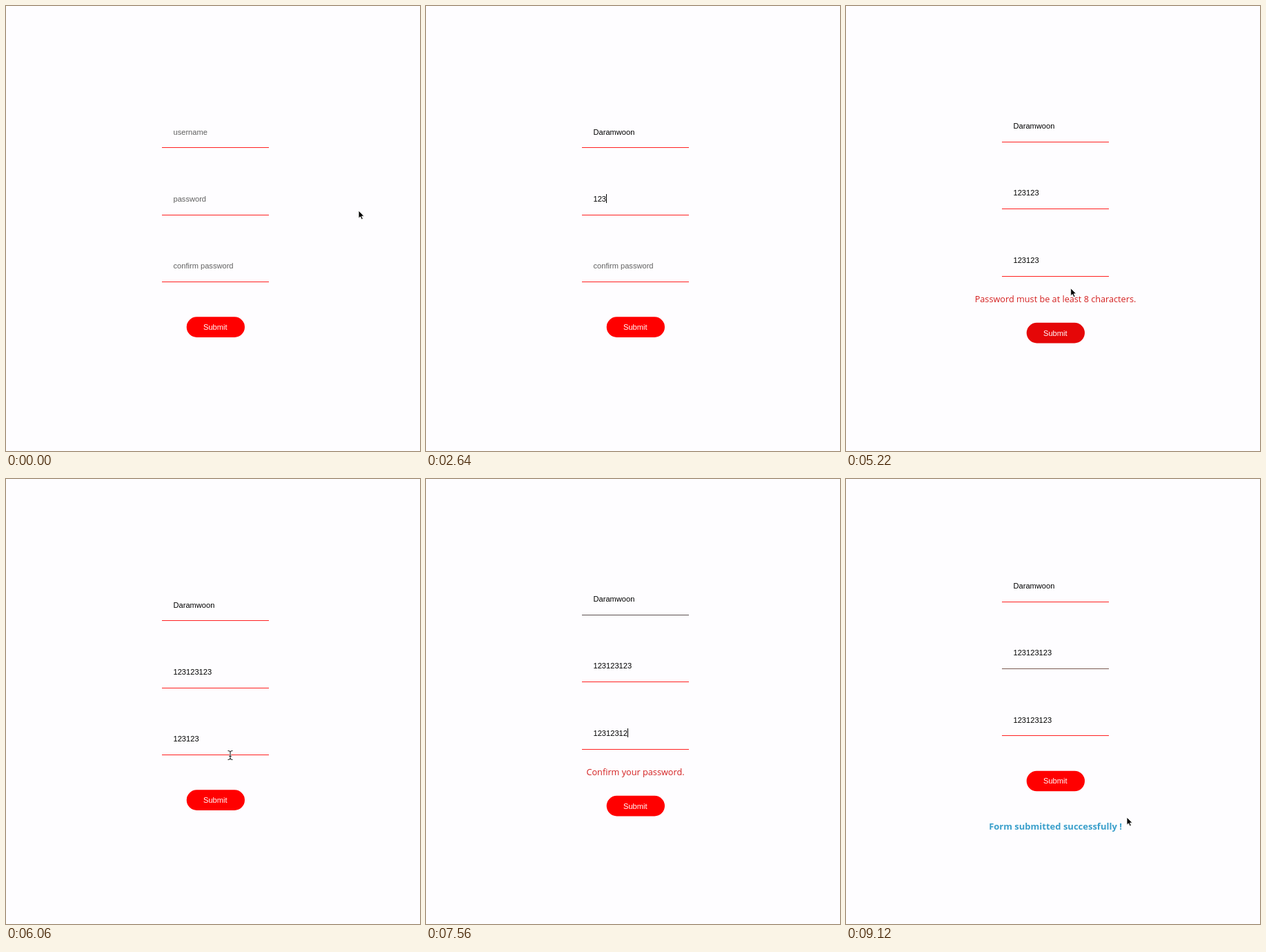
Write an HTML page that moves like this. It is 600 px wide and 646 px high and loops after 9.3 s.

```html
<!DOCTYPE html>
<html lang="en">
<head>
<meta charset="utf-8">
<title>Sign-up form</title>
<style>
  html, body { margin: 0; width: 100%; height: 100%; overflow: hidden; background: #fefdff; }
  svg { display: block; width: 600px; height: 646px; }
  .field text, .button text { font: 11.11px "Liberation Sans", Arial, sans-serif; }
  .field rect { shape-rendering: crispEdges; }
  .message { font: 12.7px "Open Sans", sans-serif; text-anchor: middle; fill: #d42020; }
  .message.success { font-size: 13px; font-weight: 700; fill: #3a9fcb; }
</style>
</head>
<body>
<svg viewBox="0 0 600 646">
  <g id="fields"></g>
  <g id="button" class="button">
    <rect x="261.7" y="451.3" width="84.3" height="29.6" rx="14.8"/>
    <text x="286" y="470" fill="#fff">Submit</text>
  </g>
  <text id="message" class="message" x="303.5"></text>
  <g id="pointer">
    <path id="arrow" d="M0 0V11.2L2.6 8.9L4.4 13L6.4 12.1L4.6 8.2H8Z" fill="#000" stroke="#fff" stroke-width=".9"/>
    <g id="beam" fill="none">
      <path d="M-3.5 -6.5Q0 -6.5 0 -4V4Q0 6.5 -3.5 6.5M3.5 -6.5Q0 -6.5 0 -4V4Q0 6.5 3.5 6.5M-1.8 1.5H1.8" stroke="#fff" stroke-width="2.4"/>
      <path d="M-3.5 -6.5Q0 -6.5 0 -4V4Q0 6.5 -3.5 6.5M3.5 -6.5Q0 -6.5 0 -4V4Q0 6.5 3.5 6.5M-1.8 1.5H1.8" stroke="#222" stroke-width="1.1"/>
    </g>
    <g id="hand" stroke="#111" stroke-width=".9" stroke-linejoin="round">
      <path d="M-1.6 1.4Q-1.6 0 -.4 0Q.7 0 1 1.2L2.1 5Q3.6 3.9 4.4 5.2Q5.7 4.3 6.4 5.6Q8.2 5 8.4 7L8.6 10Q8.4 11.6 7.6 12.3V13.8H1.8Q.6 11.6 -1.2 10.2L-3 7.8Q-3.3 6.2 -1.6 6.5L.1 7.8Z" fill="#fff"/>
      <path d="M3.2 9V12M5 9V12M6.7 9V12" stroke-width=".7"/>
    </g>
  </g>
</svg>
<script>
const LOOP = 9300, TICK = 60;
const FIELD_GAP = 97.4, TEXT_X = 242.5, LINE_Y = 205.4;
const $ = id => document.getElementById(id);

const fields = ["username", "password", "confirm password"].map(placeholder => {
  const g = document.createElementNS("http://www.w3.org/2000/svg", "g");
  g.setAttribute("class", "field");
  g.innerHTML = `<text x="${TEXT_X}" y="186.6"></text>
    <rect class="line" x="225.5" y="${LINE_Y}" width="155.5" height="1"/>
    <rect class="caret" y="176" width="1" height="13"/>`;
  $("fields").append(g);
  const [text, line, caret] = g.children;
  return { placeholder, g, text, line, caret };
});

// Each event focuses a field and appends text to it; field -1 means none.
const events = [];
const focus = (time, field, text = "") => events.push({ time, field, text });
const type = (time, field, text, step = TICK) =>
  [...text].forEach((char, i) => focus(time + i * step, field, char));

focus(60, 0);
type(360, 0, "Da", 480);
type(1500, 0, "ramwoon", 80);
focus(2220, 1);
type(2520, 1, "123");
type(2820, 1, "123");
focus(3480, 2);
type(3600, 2, "123123");
focus(4500, 1);
type(5400, 1, "123");
focus(6360, 2);
type(7380, 2, "123", 120);
focus(7920, -1);

const messages = [
  { from: 4500, to: 5460, text: "Password must be at least 8 characters." },
  { from: 6360, to: 7620, text: "Confirm your password.", faded: 0, tint: "#5c5050" },
  { from: 7920, to: LOOP, text: "Form submitted successfully !", success: true, faded: 1, tint: "#7a5a50" }
];

const mousePath = [
  [60, 511, 297], [120, 517, 297], [3000, 562, 300], [3300, 325, 383],
  [3960, 325, 383], [4320, 324, 467], [5040, 324, 467], [5280, 326, 399],
  [5940, 325, 401], [6060, 325, 401], [6300, 316, 466], [6540, 313.5, 470],
  [6900, 315, 478], [7200, 318, 495], [7680, 318, 495], [7860, 322, 472],
  [7980, 322, 472], [8400, 411, 496], [8700, 411, 496], [8820, 406, 494],
  [9000, 406, 494], [9120, 407, 491]
];
const hiddenWhileTyping = [[120, 3000], [3600, 3960], [5400, 5700], [7380, 7680]];

const within = (t, [from, to]) => t >= from && t < to;
const messageAt = t => messages.find(m => within(t, [m.from, m.to]));

function layoutAt(t) {
  const m = messageAt(t);
  if (!m) return { form: 0, button: 0 };
  return m.success ? { form: -27.8, button: -27.6 } : { form: -8.5, button: 8.5 };
}

function mouseAt(t) {
  const next = mousePath.findIndex(p => p[0] > t);
  if (next === 0) return mousePath[0].slice(1);
  if (next < 0) return mousePath[mousePath.length - 1].slice(1);
  const [t0, x0, y0] = mousePath[next - 1], [t1, x1, y1] = mousePath[next];
  const u = (t - t0) / (t1 - t0), k = u * u * (3 - 2 * u);
  return [x0 + (x1 - x0) * k, y0 + (y1 - y0) * k];
}

function targetAt(t) {
  const [x, y] = mouseAt(t), { form, button } = layoutAt(t);
  if (x > 262 && x < 346 && y > 451 + button && y < 481 + button) return "hand";
  const overField = fields.some((_, i) => {
    const bottom = LINE_Y + 1 + form + i * FIELD_GAP;
    return y > bottom - 46 && y < bottom;
  });
  return overField && x > 225 && x < 381 ? "beam" : "arrow";
}

// Averaging recent pointer states gives the button's colour transition.
function hoverAt(t) {
  const samples = 8, span = 200;
  let sum = 0;
  for (let i = 0; i < samples; i++) sum += targetAt(t - i * span / samples) === "hand";
  return sum / samples;
}

const move = (el, x, y) => el.setAttribute("transform", `translate(${x} ${y})`);
const show = (el, on) => el.setAttribute("visibility", on ? "visible" : "hidden");

function draw(t) {
  const message = messageAt(t), layout = layoutAt(t);
  const past = events.filter(e => e.time <= t);
  const last = past[past.length - 1];

  fields.forEach((f, i) => {
    const value = past.filter(e => e.field === i).map(e => e.text).join("");
    move(f.g, 0, layout.form + i * FIELD_GAP);
    f.text.textContent = value || f.placeholder;
    f.text.setAttribute("fill", value ? "#000" : "#606060");
    f.line.setAttribute("fill", message && message.faded === i ? message.tint : "#ff2020");
    const width = value ? f.text.getComputedTextLength() : 0;
    f.caret.setAttribute("x", Math.round(TEXT_X + width));
    show(f.caret, last && last.field === i && (t - last.time) % 1000 < 500);
  });

  const hover = hoverAt(t), mix = (a, b) => Math.round(a + (b - a) * hover);
  move($("button"), 0, layout.button);
  $("button").setAttribute("fill", `rgb(${mix(255, 149)},${mix(0, 28)},${mix(0, 30)})`);

  const label = $("message");
  label.textContent = message ? message.text : "";
  label.setAttribute("class", message && message.success ? "message success" : "message");
  label.setAttribute("y", message && message.success ? 509.3 : 429.7);

  const target = targetAt(t), visible = !hiddenWhileTyping.some(span => within(t, span));
  move($("pointer"), ...mouseAt(t));
  for (const id of ["arrow", "beam", "hand"]) show($(id), visible && id === target);
}

const start = performance.now();
function frame() {
  const t = (performance.now() - start) % LOOP;
  draw(Math.floor(t / TICK) * TICK);
  requestAnimationFrame(frame);
}
frame();
</script>
</body>
</html>
```
